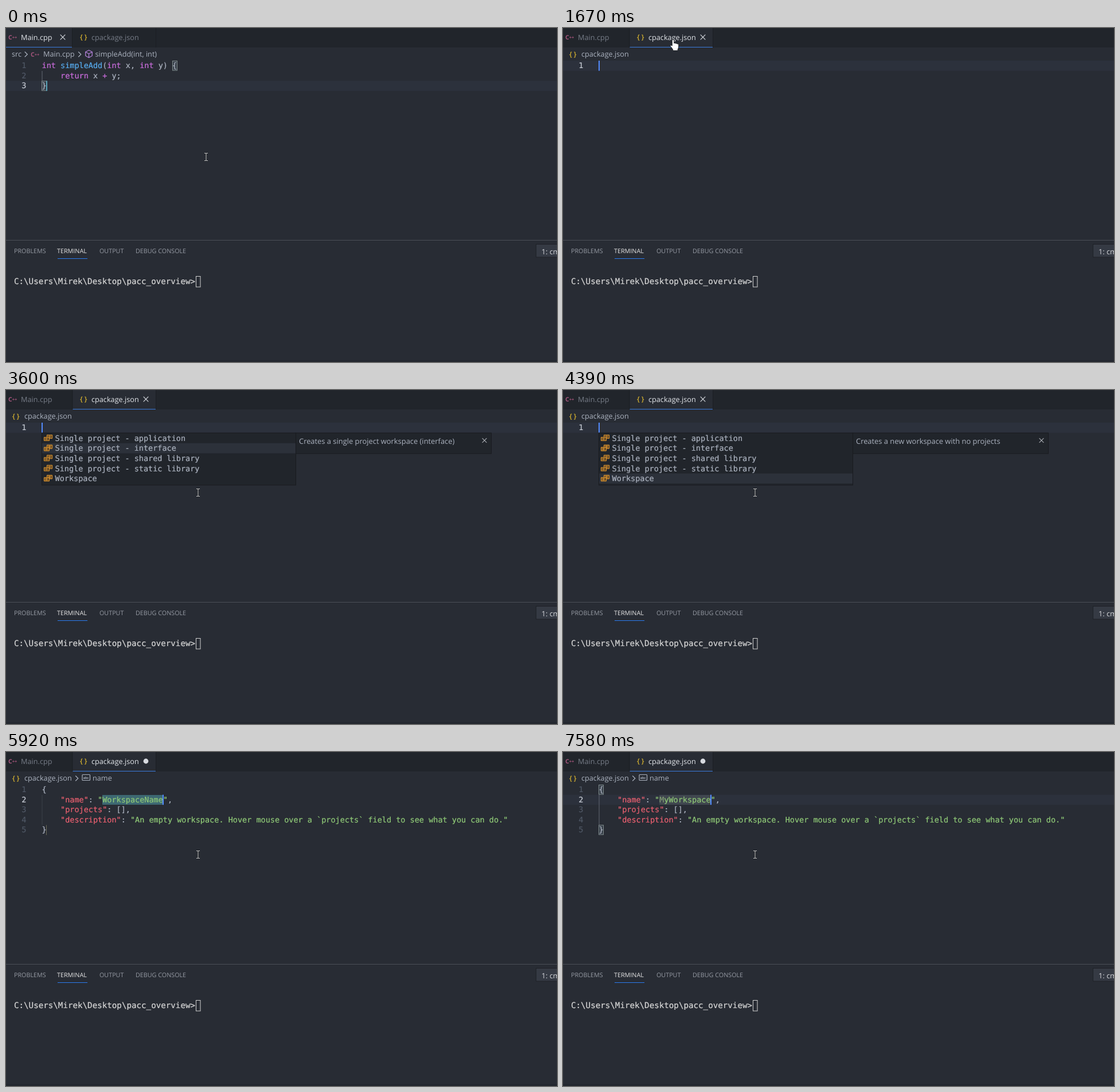
Recreate the animation shown at these times as an HTML page. Size 961 by 583 pixels, loop 8 s.

```html
<!DOCTYPE html>
<html lang="en">
<head>
<meta charset="utf-8">
<title>Editor workspace snippet</title>
<style>
html, body { margin: 0; width: 100%; height: 100%; overflow: hidden; background: #282c34; }
svg { display: block; width: 100vw; height: 100vh; }
text { white-space: pre; text-rendering: geometricPrecision; color: #abb2bf; }
text, tspan { fill: currentColor; }
.code { font: 13.5px "DejaVu Sans Mono", monospace; }
.term { font: 14.2px "DejaVu Sans Mono", monospace; color: #d6d6d6; }
.code, .term, .code tspan { stroke: currentColor; stroke-width: .22; }
.ui { font: 12.7px "Open Sans", sans-serif; }
.doc { font: 12.9px "Open Sans", sans-serif; }
.panel { font: 10.75px "Open Sans", sans-serif; color: #969ba4; }
.panel.on { color: #e7e7e7; }
.cpp { font: bold 10.5px "Open Sans", sans-serif; color: #a5557c; }
.plus { font-size: 7.5px; }
.json { font: 600 12px "Open Sans", sans-serif; color: #d3b02f; }
.kw { color: #cb6ddd; }
.fn { color: #58aef2; }
.key { color: #ea6070; }
.str { color: #8fc977; }
.dim { color: #7f9a73; }
.num { color: #4f5765; text-anchor: end; }
.num.on { color: #c3c8d1; }
.tab { color: #767c87; }
.tab.on, .crumb.on { color: #e2e5ea; }
.line { fill: none; stroke: #abb2bf; stroke-width: 1.2; }
.match { fill: #38404a; stroke: #7f8b8c; }
.cube { fill: none; stroke: #b180d7; stroke-width: 1.3; stroke-linejoin: round; }
.hl { fill: #2c313c; }
</style>
</head>
<body>
<svg viewBox="0 0 961 583" preserveAspectRatio="none">
  <defs>
    <path id="close" d="M-4.3-4.3 4.3 4.3M4.3-4.3-4.3 4.3" stroke="#d7dae0" stroke-width="1.2"/>
    <path id="chevron" class="line" d="M-2.3-4.5 2.3 0-2.3 4.5"/>
    <path id="beamShape" d="M-3-6.5H-1L0-6 1-6.5H3M0-6V6M-3 6.5H-1L0 6 1 6.5H3"/>
    <text id="cpp" class="cpp">C<tspan class="plus" dy="-1">++</tspan></text>
    <g id="json"><text class="json">{</text><text class="json" x="8">}</text></g>
    <g id="snippet" fill="#5b4528" stroke="#e0952c" stroke-width="1.1">
      <rect x="5.5" y="-5.5" width="9" height="6" rx=".5"/><path d="M8-3.5h4M8-1.5h4"/>
      <rect x=".5" y="-1.5" width="9" height="6" rx=".5"/><path d="M2.5.5h4M2.5 2.5h4"/>
    </g>
  </defs>
  <rect width="961" height="583" fill="#282c34"/>

  <rect width="961" height="34" fill="#21252b"/>
  <rect id="activeTab" height="34" fill="#282c34"/>
  <path d="M115.5 0V34M261.5 0V34" stroke="#1b1e23"/>
  <rect id="tabLine" y="33" height="1" fill="#3a7bdc"/>
  <use href="#cpp" x="4" y="20"/>
  <text id="mainTab" class="ui tab" x="26" y="21">Main.cpp</text>
  <use id="mainClose" href="#close" x="99" y="16"/>
  <use href="#json" x="129" y="20"/>
  <text id="jsonTab" class="ui tab" x="149" y="21">cpackage.json</text>
  <use id="jsonClose" href="#close" x="244" y="16"/>
  <circle id="dirty" cx="244" cy="16" r="4.4" fill="#d7dae0"/>

  <g id="cppView">
    <rect class="hl" y="92.2" width="961" height="17.6"/>
    <text class="ui" x="10" y="50">src</text>
    <use href="#chevron" x="35" y="46"/>
    <use href="#cpp" x="43" y="49.5"/>
    <text class="ui" x="65" y="50">Main.cpp</text>
    <use href="#chevron" x="128.5" y="46"/>
    <path class="cube" d="M144.5 38.7 150.3 41.8V48.5L144.5 51.7 138.7 48.5V41.8ZM138.7 41.8 144.5 45 150.3 41.8M144.5 45V51.7"/>
    <text id="symbol" class="ui crumb" x="155.5" y="50">simpleAdd(int, int)</text>
    <path d="M63 75V92" stroke="#626975"/>
    <rect class="match" x="290.5" y="57.5" width="8" height="16.5"/>
    <rect class="match" x="62.5" y="92.7" width="8" height="16.5"/>
    <text class="code" x="62.5" y="70"><tspan class="kw">int </tspan><tspan class="fn">simpleAdd</tspan>(<tspan class="kw">int</tspan> x, <tspan class="kw">int</tspan> y) {</text>
    <text class="code" x="62.5" y="87.6">    <tspan class="kw">return</tspan> x <tspan class="kw">+</tspan> y;</text>
    <text class="code" x="62.5" y="105.2">}</text>
  </g>

  <g id="jsonView">
    <use href="#json" x="11" y="49.5"/>
    <text class="ui" x="32" y="50">cpackage.json</text>
    <g id="nameCrumb">
      <use href="#chevron" x="123.5" y="46"/>
      <rect class="line" x="133" y="39.5" width="13.5" height="10" rx="1"/>
      <text x="134.8" y="46.7" font-size="5.5" font-weight="bold" font-family="Open Sans, sans-serif">abc</text>
      <text class="ui" x="151" y="50">name</text>
    </g>
    <rect id="emptyLine" class="hl" y="57" width="961" height="17.6"/>
    <g id="workspace">
      <rect id="nameLine" class="hl" y="74.6" width="961" height="17.6"/>
      <path id="guide" d="M63 75V127"/>
      <rect id="nameBox" x="168" y="75" height="17"/>
      <path id="endStop" d="M70.5 127.5V145" stroke="#6a6a58"/>
      <g id="pair">
        <rect class="match" x="62.5" y="57.5" width="8" height="16.5"/>
        <rect class="match" x="62.5" y="127.7" width="8" height="16.5"/>
      </g>
      <text class="code" x="62.5" y="70">{</text>
      <text class="code" x="62.5" y="87.6">    <tspan class="key">"name"</tspan>: <tspan class="str">"<tspan id="nameHead"></tspan><tspan id="nameRest"></tspan>"</tspan>,</text>
      <text class="code" x="62.5" y="105.2">    <tspan class="key">"projects"</tspan>: [],</text>
      <text class="code" x="62.5" y="122.8">    <tspan class="key">"description"</tspan>: <tspan class="str">"An empty workspace. Hover mouse over a `projects` field to see what you can do."</tspan></text>
      <text class="code" x="62.5" y="140.4">}</text>
    </g>
  </g>
  <g id="numbers"></g>
  <rect id="caret" width="2" height="17.6"/>

  <g id="popup">
    <rect x="62.5" y="75" width="443" height="91" fill="#21252b" stroke="#181a1f"/>
    <rect id="picked" x="63" width="442" height="17.6" fill="#2c313a"/>
    <g id="options"></g>
    <rect x="505.5" y="75" width="341" height="36" fill="#21252b" stroke="#181a1f"/>
    <text id="hint" class="doc" x="511" y="93.5"></text>
    <use href="#close" transform="translate(834.5 88) scale(.9)" opacity=".75"/>
  </g>

  <path d="M0 370.5H961" stroke="#4a4e57"/>
  <text class="panel" x="14" y="393">PROBLEMS</text>
  <text class="panel on" x="89" y="393">TERMINAL</text>
  <text class="panel" x="163" y="393">OUTPUT</text>
  <text class="panel" x="226" y="393">DEBUG CONSOLE</text>
  <rect x="90" y="402" width="52" height="1" fill="#2b7cf0"/>
  <rect x="924.5" y="377.5" width="60" height="22.5" fill="#353a44" stroke="#1e2126"/>
  <text class="ui" x="934" y="394.5" style="color:#d8dadd">1: cmd</text>
  <text class="term" x="14" y="447">C:\Users\Mirek\Desktop\pacc_overview&gt;</text>
  <rect x="331.5" y="433.5" width="7.5" height="18.5" fill="none" stroke="#d0d0d0"/>
  <rect y="580" width="961" height="3" fill="#23272e"/>

  <g id="beam" fill="none">
    <use href="#beamShape" stroke="#15181c" stroke-width="2.2"/>
    <use href="#beamShape" stroke="#d2d2d2"/>
  </g>
  <path id="hand" fill="#fff" stroke="#15181c" stroke-width=".9" stroke-linejoin="round" d="M-1.7 1.5Q0-1.2 1.7 1.5V6.5Q3.5 5.5 4.3 7 6.2 6.2 7 7.7 9.5 7 9.7 9.5V13Q9.5 15.5 8.2 17V19.5H-.3V17.5L-4.8 11.5Q-4 8.8-1.7 11Z"/>
</svg>
<script>
const LOOP = 8000, ROW = 17.6, TOP = 57, CHAR = 8.127, LEFT = 62.5;
const TYPED = "MyWorkspace";
const KEY_TIMES = [6250, 6460, 6590, 6720, 6850, 6980, 7110, 7250, 7320, 7420, 7520];
const PICK_TIMES = [3600, 3790, 4000, 4260];
const CARET_ON = [[0, 70], [500, 1000], [1410, 1900], [2400, 2930], [3400, 3930], [4390, 5520], [5920, 8000]];
const OPTIONS = [
  ["Single project - application", "Creates a single project workspace (application)"],
  ["Single project - interface", "Creates a single project workspace (interface)"],
  ["Single project - shared library", "Creates a single project workspace (shared library)"],
  ["Single project - static library", "Creates a single project workspace (static library)"],
  ["Workspace", "Creates a new workspace with no projects"]
];
// time, x, y of the pointer's hot spot
const POINTER = [
  [70, 349, 225], [470, 285, 128], [870, 213, 36], [1070, 195, 21], [1210, 192, 20],
  [1700, 192, 20], [1950, 250, 82], [2200, 323, 157], [2600, 333, 178], [2930, 333, 178], [3000, 335, 179]
];

const $ = id => document.getElementById(id);
const show = (id, on) => { $(id).style.display = on ? "" : "none"; };
const attr = (id, values) => { for (const k in values) $(id).setAttribute(k, values[k]); };
const passed = (times, t) => times.filter(at => t >= at).length;
const rowTop = n => TOP + ROW * n;

$("options").innerHTML = OPTIONS.map(([label], i) =>
  `<use href="#snippet" x="66" y="${84 + ROW * i}"/>
   <text class="code" x="85.5" y="${88.8 + ROW * i}">${label}</text>`).join("");
$("numbers").innerHTML = [0, 1, 2, 3, 4].map(i =>
  `<text class="code num" x="35.5" y="${70 + ROW * i}">${i + 1}</text>`).join("");

function pointerAt(t) {
  const next = POINTER.findIndex(p => p[0] > t);
  if (next === 0) return POINTER[0].slice(1);
  if (next < 0) return POINTER.at(-1).slice(1);
  const [a, b] = [POINTER[next - 1], POINTER[next]];
  const k = (t - a[0]) / (b[0] - a[0]);
  return [a[1] + (b[1] - a[1]) * k, a[2] + (b[2] - a[2]) * k];
}

function drawPointer(t, json) {
  const [x, y] = pointerAt(t).map(Math.round);
  const onTab = y < 34, onCrumb = !json && y >= 34 && y < 55;
  const hand = onTab || onCrumb;
  show("hand", hand);
  show("beam", !hand);
  attr(hand ? "hand" : "beam", { transform: `translate(${x} ${y})` });
  $("symbol").classList.toggle("on", onCrumb);
  return onTab;
}

function drawTabs(json, filled, hover) {
  const box = json ? { x: 116.5, width: 144.5 } : { x: 0, width: 115 };
  attr("activeTab", box);
  attr("tabLine", box);
  $("mainTab").classList.toggle("on", !json);
  $("jsonTab").classList.toggle("on", json || hover);
  show("mainClose", !json);
  show("jsonClose", !filled && (json || hover));
  show("dirty", filled);
}

function drawName(typed) {
  const name = typed ? TYPED.slice(0, typed) : "WorkspaceName";
  $("nameHead").textContent = name[0];
  $("nameHead").setAttribute("class", typed ? "dim" : "str");
  $("nameRest").textContent = name.slice(1);
  attr("nameBox", { width: name.length * CHAR, fill: typed ? "#40474f" : "#3d6872" });
  attr("guide", { stroke: typed ? "#626975" : "#3b4048" });
  show("nameLine", typed);
  show("pair", typed);
  show("endStop", !typed);
  return LEFT + (13 + name.length) * CHAR;
}

function render(t) {
  const json = t >= 1410, filled = t >= 4990;
  show("cppView", !json);
  show("jsonView", json);
  show("workspace", filled);
  show("emptyLine", !filled);
  show("nameCrumb", t >= 5320);
  drawTabs(json, filled, drawPointer(t, json));

  const nameEnd = drawName(passed(KEY_TIMES, t));
  const line = filled ? 1 : json ? 0 : 2;
  const lines = filled ? 5 : json ? 1 : 3;
  [...$("numbers").children].forEach((n, i) => {
    n.style.display = i < lines ? "" : "none";
    n.classList.toggle("on", i === line);
  });
  const caretX = filled ? nameEnd : json ? LEFT : LEFT + CHAR;
  attr("caret", {
    x: Math.floor(caretX),
    y: rowTop(line),
    fill: t < 70 ? "#58a3b8" : "#528bff"
  });
  show("caret", CARET_ON.some(([from, to]) => t >= from && t < to));

  const pick = passed(PICK_TIMES, t);
  show("popup", t >= 2800 && !filled);
  attr("picked", { y: rowTop(pick + 1) + 0.7 });
  $("hint").textContent = OPTIONS[pick][1];
}

let start;
function tick(now) {
  start ??= now;
  render((now - start) % LOOP);
  requestAnimationFrame(tick);
}
render(0);
requestAnimationFrame(tick);
</script>
</body>
</html>
```
